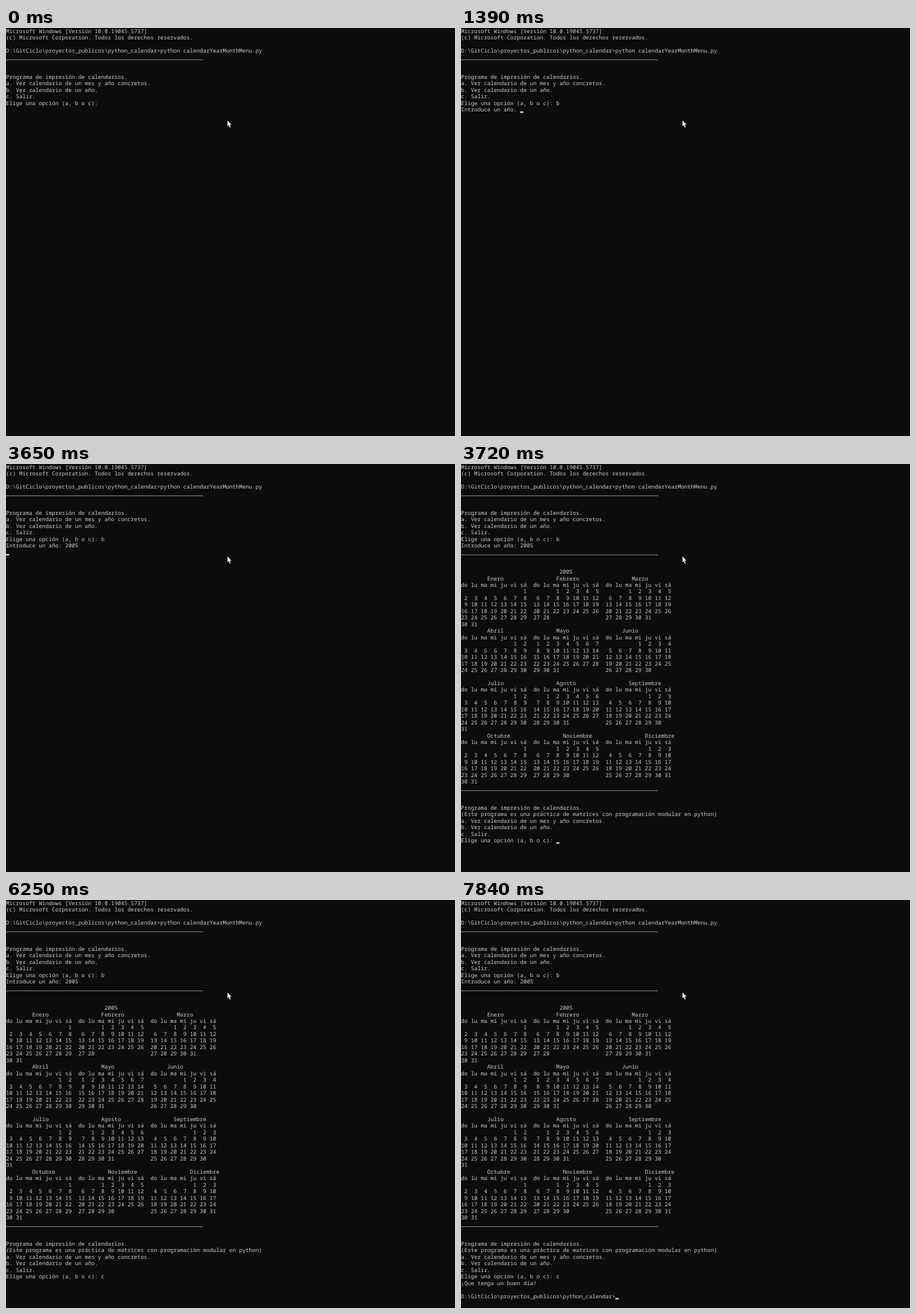
An HTML page with a canvas that plays this animation: 784 by 714 pixels, repeating every 9.42 s.

```html
<!DOCTYPE html>
<html lang="es">
<head>
<meta charset="utf-8">
<title>Calendario</title>
<style>
  html, body { margin: 0; width: 100%; height: 100%; overflow: hidden; background: #0c0c0c; }
  canvas { display: block; }
</style>
</head>
<body>
<canvas id="stage" width="784" height="714"></canvas>
<script>
const ctx = document.getElementById('stage').getContext('2d');
const LOOP = 9420;
// The console grid has 8 x 16 cells, shown at a reduced scale.
const CELL_W = 8, CELL_H = 16, BASELINE = 12;
const SCALE = 344 / 480;

const PROMPT = 'D:\\GitCiclo\\proyectos_publicos\\python_calendar>';
const CHOICE = 'Elige una opción (a, b o c): ';
const YEAR_PROMPT = 'Introduce un año: ';
const OPTIONS = [
  'a. Ver calendario de un mes y año concretos.',
  'b. Ver calendario de un año.',
  'c. Salir.'
];
const TITLE = 'Programa de impresión de calendarios.';

// Month names with their console columns
const MONTHS = [
  ['Enero', 8], ['Febrero', 29], ['Marzo', 52],
  ['Abril', 8], ['Mayo', 29], ['Junio', 49],
  ['Julio', 8], ['Agosto', 29], ['Septiembre', 51],
  ['Octubre', 8], ['Noviembre', 31], ['Diciembre', 56]
];

// Each step: start time, typed option, typed year, final answer, cursor [row, column]
const STEPS = [
  { at: 0 },
  { at: 460, cursor: [11, 29] },
  { at: 790, option: 'b', cursor: [11, 30] },
  { at: 990, option: 'b' },
  { at: 1390, option: 'b', year: '', cursor: [12, 18] },
  { at: 2050, option: 'b', year: '2', cursor: [12, 19] },
  { at: 2120, option: 'b', year: '20', cursor: [12, 20] },
  { at: 2390, option: 'b', year: '200', cursor: [12, 21] },
  { at: 2590, option: 'b', year: '2005', cursor: [12, 22] },
  { at: 3120, option: 'b', year: '2005' },
  { at: 3650, option: 'b', year: '2005', cursor: [13, 0] },
  { at: 3720, option: 'b', year: '2005', answer: '', cursor: [57, 29] },
  { at: 4640, option: 'b', year: '2005', answer: '' },
  { at: 5170, option: 'b', year: '2005', answer: 'c', cursor: [57, 30] },
  { at: 5240, option: 'b', year: '2005', answer: 'c' },
  { at: 5700, option: 'b', year: '2005', answer: 'c', cursor: [57, 30] },
  { at: 6250, option: 'b', year: '2005', answer: 'c' },
  { at: 6450, option: 'b', year: '2005', answer: 'c', done: true, cursor: [60, 47] },
  { at: 7310, option: 'b', year: '2005', answer: 'c', done: true },
  { at: 7840, option: 'b', year: '2005', answer: 'c', done: true, cursor: [60, 47] }
];

function print(row, text, col = 0) {
  [...text].forEach((char, i) => {
    if (char !== ' ') ctx.fillText(char, (col + i) * CELL_W, row * CELL_H + BASELINE);
  });
}

function printLines(row, lines) {
  lines.forEach((line, i) => print(row + i, line));
}

function rule(row) {
  ctx.fillRect(0, row * CELL_H + 13.3, 60 * CELL_W, 1);
}

function printMonth(index) {
  const [name, nameCol] = MONTHS[index];
  const row = 17 + 8 * Math.floor(index / 3);
  const left = 22 * (index % 3);
  const first = new Date(2005, index, 1).getDay();
  const days = new Date(2005, index + 1, 0).getDate();
  print(row, name, nameCol);
  print(row + 1, 'do lu ma mi ju vi sá', left);
  for (let day = 1; day <= days; day++) {
    const slot = first + day - 1;
    print(row + 2 + Math.floor(slot / 7), String(day).padStart(2), left + 3 * (slot % 7));
  }
}

function drawPointer() {
  ctx.save();
  ctx.translate(386 / SCALE, 161 / SCALE);
  ctx.beginPath();
  [[1, 1.2], [1, 15.5], [4.2, 12.6], [6.6, 18.4], [8.8, 17.5], [6.4, 11.8], [10.8, 11.5]]
    .forEach(([x, y]) => ctx.lineTo(x, y));
  ctx.closePath();
  ctx.fillStyle = '#f4f4f4';
  ctx.fill();
  ctx.restore();
}

function draw(step) {
  ctx.setTransform(1, 0, 0, 1, 0, 0);
  ctx.fillStyle = '#0c0c0c';
  ctx.fillRect(0, 0, 784, 714);
  ctx.setTransform(SCALE, 0, 0, SCALE, 0, 0);
  ctx.font = '13.333px "Noto Sans Mono", "DejaVu Sans Mono", monospace';
  ctx.textRendering = 'geometricPrecision';
  ctx.fillStyle = '#cccccc';

  printLines(0, [
    'Microsoft Windows [Versión 10.0.19045.5737]',
    '(c) Microsoft Corporation. Todos los derechos reservados.',
    '',
    PROMPT + 'python calendarYearMonthMenu.py'
  ]);
  rule(4);
  printLines(7, [TITLE, ...OPTIONS, CHOICE + (step.option || '')]);
  if (step.year !== undefined) print(12, YEAR_PROMPT + step.year);

  if (step.answer !== undefined) {
    rule(13);
    print(16, '2005', 30);
    MONTHS.forEach((_, i) => printMonth(i));
    rule(49);
    printLines(52, [
      TITLE,
      '(Este programa es una práctica de matrices con programación modular en python)',
      ...OPTIONS,
      CHOICE + step.answer
    ]);
  }
  if (step.done) printLines(58, ['¡Que tenga un buen día!', '', PROMPT]);

  if (step.cursor) {
    const [row, col] = step.cursor;
    ctx.fillStyle = '#f4f4f4';
    ctx.fillRect(col * CELL_W, row * CELL_H + 12, CELL_W, 3);
  }
  drawPointer();
}

let shown = null;
const start = performance.now();

function tick() {
  const time = (performance.now() - start) % LOOP;
  const step = STEPS.findLast(s => s.at <= time);
  if (step !== shown) draw(shown = step);
  requestAnimationFrame(tick);
}
tick();
</script>
</body>
</html>
```
